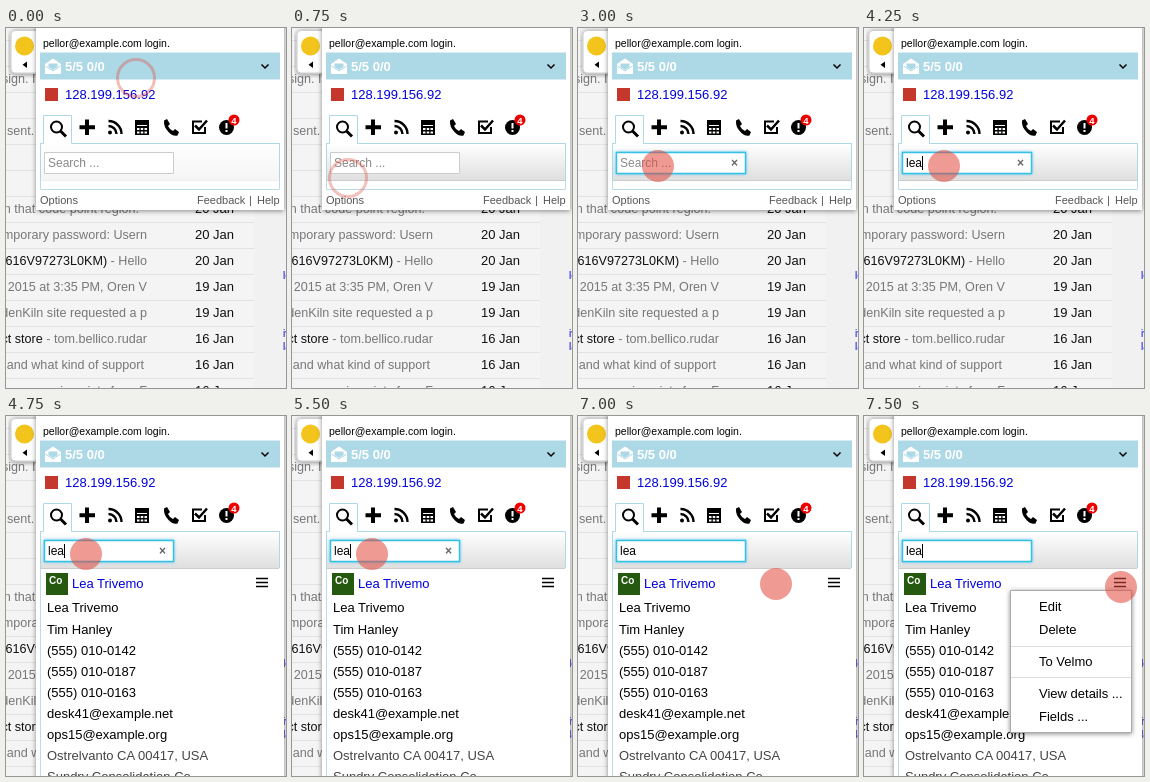
An HTML page for the animation above (8000 ms loop, 280 by 360 pixels).

```html
<!DOCTYPE html>
<html lang="en">
<head>
<meta charset="utf-8">
<title>Contact search</title>
<style>
html, body { margin: 0; width: 100%; height: 100%; overflow: hidden; background: #f4f4f4; }
svg { display: block; width: 280px; height: 360px; font: 13px "Liberation Sans", Arial, sans-serif; }
text { white-space: pre; }
.subject { fill: #777; font-size: 12.6px; }
.end { text-anchor: end; }
.link { fill: #00d; }
.small { font-size: 11px; fill: #555; }
.field { font-size: 12px; }
.line { fill: none; stroke: #000; }

/* Everything shares one 8 s clock and changes in hard steps */
.anim { animation: 8s step-end infinite; }
.short { animation-name: short; }
.tall { animation-name: tall; }
.shade { animation-name: shade; }
.idle { animation-name: idle; }
.focus { animation-name: focus; }
.clear { animation-name: clear; }
.hint { animation-name: hint; }
.key1 { animation-name: key1; }
.key2 { animation-name: key2; }
.key3 { animation-name: key3; }
.caret { animation-name: caret; }
.menu { animation-name: menu; }
.ring { animation-name: ring; }
.dot { animation-name: dot; }

@keyframes short { 0% { opacity: 1 } 59.375%, 100% { opacity: 0 } }
@keyframes tall { 0% { opacity: 0 } 59.375%, 100% { opacity: 1 } }
@keyframes shade { 0% { opacity: .3 } 3.125%, 100% { opacity: 1 } }
@keyframes idle { 0% { opacity: 1 } 18.75%, 100% { opacity: 0 } }
@keyframes focus { 0% { opacity: 0 } 18.75%, 100% { opacity: 1 } }
@keyframes clear { 0% { opacity: 0 } 18.75% { opacity: 1 } 84.375%, 100% { opacity: 0 } }
@keyframes hint { 0% { opacity: 1 } 40.625%, 100% { opacity: 0 } }
@keyframes key1 { 0% { opacity: 0 } 40.625%, 100% { opacity: 1 } }
@keyframes key2 { 0% { opacity: 0 } 46.875%, 100% { opacity: 1 } }
@keyframes key3 { 0% { opacity: 0 } 53.125%, 100% { opacity: 1 } }
@keyframes menu { 0% { opacity: 0 } 93.75%, 100% { opacity: 1 } }
@keyframes caret {
  0% { opacity: 0; transform: none }
  31.25% { opacity: 1; transform: none }
  37.5% { opacity: 0; transform: none }
  40.625% { opacity: 1; transform: translateX(3px) }
  46.875% { opacity: 1; transform: translateX(9px) }
  53.125% { opacity: 1; transform: translateX(16px) }
  62.5% { opacity: 0; transform: translateX(16px) }
  68.75% { opacity: 1; transform: translateX(16px) }
  75% { opacity: 0; transform: translateX(16px) }
  81.25% { opacity: 1; transform: translateX(16px) }
  87.5% { opacity: 0; transform: translateX(16px) }
  93.75%, 100% { opacity: 1; transform: translateX(16px) }
}
@keyframes ring {
  0% { opacity: .36; transform: translate(130px, 50px) }
  3.125% { opacity: .36; transform: translate(108px, 82px) }
  6.25% { opacity: .34; transform: translate(76px, 124px) }
  9.375% { opacity: .34; transform: translate(56px, 150px) }
  12.5% { opacity: .34; transform: translate(58px, 149px) }
  15.625% { opacity: .34; transform: translate(64px, 146px) }
  18.75% { opacity: .3; transform: translate(72px, 147px) }
  21.875% { opacity: .24; transform: translate(78px, 152px) scale(1.06) }
  25% { opacity: .16; transform: translate(80px, 155px) scale(1.14) }
  28.125% { opacity: .08; transform: translate(80px, 155px) scale(1.18) }
  31.25%, 100% { opacity: 0; transform: translate(80px, 155px) }
}
@keyframes dot {
  0% { opacity: 0; transform: translate(80px, 138px) }
  31.25% { opacity: .55; transform: translate(80px, 138px) }
  81.25% { opacity: .55; transform: translate(72px, 157px) }
  84.375% { opacity: .55; transform: translate(124px, 163px) }
  87.5% { opacity: .55; transform: translate(198px, 168px) }
  90.625%, 100% { opacity: .55; transform: translate(257px, 171px) }
}
</style>
</head>
<body>
<svg viewBox="0 0 280 360">
  <defs>
    <pattern id="rows" width="248" height="26" y="12" patternUnits="userSpaceOnUse">
      <path d="M0 .5H248" stroke="#e3e3e3"/>
    </pattern>
    <linearGradient id="bar" x2="0" y2="1">
      <stop offset="0" stop-color="#fff"/>
      <stop offset="1" stop-color="#dfdfdf"/>
    </linearGradient>
    <filter id="shadow" x="-10%" y="-10%" width="120%" height="120%">
      <feDropShadow dx="0" dy="1" stdDeviation="2.5" flood-opacity=".45"/>
    </filter>
    <filter id="glow" x="-10%" y="-40%" width="120%" height="180%">
      <feDropShadow dx="0" dy="0" stdDeviation="1.6" flood-color="#3cc3e8" flood-opacity=".8"/>
    </filter>
    <clipPath id="clip"><path d="M0 0H141V360H0z"/></clipPath>
  </defs>

  <!-- Mail list -->
  <path d="M0 0H280V360H0z" fill="#f4f4f4"/>
  <path d="M0 0H248V360H0z" fill="url(#rows)"/>
  <path d="M248 0H280V360H248z" fill="#f1f1f1"/>
  <g class="subject" clip-path="url(#clip)">
    <text x="-4" y="55">sign. I</text>
    <text x="1" y="107">sent. I</text>
    <g class="end">
      <text x="133" y="185">n that code point region.</text>
      <text x="141" y="211">emporary password: Usern</text>
      <text x="141" y="237"><tspan fill="#111">616V97273L0KM)</tspan> - Hello</text>
      <text x="141" y="263">2015 at 3:35 PM, Oren V</text>
      <text x="141" y="289">denKiln site requested a p</text>
      <text x="141" y="315"><tspan fill="#111">ct store</tspan> - tom.bellico.rudar</text>
      <text x="138" y="341">and what kind of support</text>
      <text x="141" y="367">e main points from F</text>
    </g>
  </g>
  <g fill="#111">
    <text x="189" y="185">20 Jan</text>
    <text x="189" y="211">20 Jan</text>
    <text x="189" y="237">20 Jan</text>
    <text x="189" y="263">19 Jan</text>
    <text x="189" y="289">19 Jan</text>
    <text x="189" y="315">16 Jan</text>
    <text x="189" y="341">16 Jan</text>
    <text x="189" y="367">16 Jan</text>
  </g>
  <g class="link" font-size="10">
    <text x="277" y="251">le</text>
    <text x="277" y="309">iv</text>
    <text x="277" y="322">la</text>
  </g>

  <!-- Side tab -->
  <path d="M34 2.500H9q-4 0-4 4V41q0 4 4 4H34z" fill="#fff" stroke="#ccc" filter="url(#shadow)"/>
  <circle cx="18.500" cy="18" r="9.500" fill="#f3c51c"/>
  <path d="M21 33.500V40L16.500 36.750z"/>

  <!-- Popup -->
  <g class="anim short">
    <path d="M30 -6H278V182H30z" fill="#fff" filter="url(#shadow)"/>
    <path d="M34.500 115V161.500H273.500V115" fill="none" stroke="#b9dce8"/>
    <text class="small" x="34" y="176">Options</text>
    <text class="small" x="191" y="176">Feedback</text>
    <text class="small" x="243" y="176">|</text>
    <text class="small" x="251" y="176">Help</text>
  </g>
  <g class="anim tall">
    <path d="M30 -6H278V370H30z" fill="#fff" filter="url(#shadow)"/>
    <path d="M34.500 115V360" stroke="#b9dce8"/>
    <path d="M40 157H62V179H40z" fill="#24590f"/>
    <text x="43" y="168" font-size="10" font-weight="bold" fill="#fff">Co</text>
    <text class="link" x="66" y="172">Lea Trivemo</text>
    <path class="line" d="M250 162.500H262M250 166.500H262M250 170.500H262" stroke-width="1.400"/>
    <text x="41" y="196">Lea Trivemo</text>
    <text x="41" y="218">Tim Hanley</text>
    <text x="41" y="239">(555) 010-0142</text>
    <text x="41" y="260">(555) 010-0187</text>
    <text x="41" y="281">(555) 010-0163</text>
    <text x="41" y="302">desk41@example.net</text>
    <text x="41" y="323">ops15@example.org</text>
    <text x="41" y="344" fill="#444">Ostrelvanto CA 00417, USA</text>
    <text x="41" y="365" fill="#444">Sundry Consolidation Co</text>
  </g>

  <!-- Header -->
  <text x="37" y="19" font-size="10.500">pellor@example.com login.</text>
  <path d="M34 24.500H274V51.500H34z" fill="#add8e6"/>
  <path d="M39 36L47 30.500L55 36V46H39z" fill="#fff"/>
  <path d="M42.500 35.500H51.500V39L47 42L42.500 39z" fill="#add8e6"/>
  <path d="M39.500 38L47 43L54.500 38" fill="none" stroke="#add8e6"/>
  <text x="59" y="43" font-weight="bold" fill="#fff">5/5 0/0</text>
  <path class="line" d="M255.500 36.500L259 40L262.500 36.500" stroke-width="1.500"/>
  <path d="M39 60H52V73H39z" fill="#c5372c"/>
  <text class="link" x="59" y="71">128.199.156.92</text>

  <!-- Tool tabs -->
  <path class="anim shade" d="M35 116H273V152H35z" fill="url(#bar)"/>
  <path d="M34.500 152V115.500H37.500V87.500H65.500V115.500H273.500V152" fill="none" stroke="#add8e6"/>
  <path d="M38 88H65V117H38z" fill="#fff"/>
  <path class="anim shade" d="M35 152.500H273" stroke="#ccc"/>
  <g class="line" stroke-width="2">
    <circle cx="50.500" cy="99" r="5.500"/>
    <path d="M54.500 103L60 108.500" stroke-width="3"/>
    <path d="M81 91.500V107M73.500 99.250H89" stroke-width="4"/>
    <path d="M102.500 93A13 13 0 0 1 115.500 106M102.500 98A8 8 0 0 1 110.500 106" stroke-width="2.400"/>
    <path d="M196 93.500H187V105H199V99"/>
    <path d="M189 97.500L193 101.500L201 92.500" stroke-width="2.500"/>
  </g>
  <circle cx="104" cy="104.500" r="2"/>
  <path d="M129 92H143V107H129z"/>
  <path d="M131 97.500H141" stroke="#fff"/>
  <path d="M131 101H141M131 104.500H141" stroke="#fff" stroke-width="2" stroke-dasharray="2.500 1.250"/>
  <path d="M158 92.500l3-1.500 3 5-2 2q1.500 3.500 5 5l2-2 4 3-1.500 3.500q-4 1.500-9-3.500t-4.500-11.500z"/>
  <circle cx="220.500" cy="99.500" r="7.500"/>
  <path d="M220.500 95V100.500M220.500 102V104" stroke="#fff" stroke-width="2"/>
  <circle cx="228" cy="92" r="5.500" fill="#e00"/>
  <text x="228" y="95.500" font-size="9.500" font-weight="bold" fill="#fff" text-anchor="middle">4</text>

  <!-- Search field -->
  <path class="anim idle" d="M38.500 124.500H167.500V145.500H38.500z" fill="#fff" stroke="#ccc"/>
  <path class="anim focus" d="M38.500 124.500H167.500V145.500H38.500z" fill="#fff" stroke="#35c0e6" stroke-width="1.500" filter="url(#glow)"/>
  <g class="field">
    <text class="anim hint" x="42" y="139" fill="#8a8a8a">Search ...</text>
    <text class="anim key1" x="42" y="139">l</text>
    <text class="anim key2" x="44.670" y="139">e</text>
    <text class="anim key3" x="51.340" y="139">a</text>
    <path class="anim caret" d="M42.500 128V142" stroke="#000"/>
    <text class="anim clear" x="153" y="139" font-weight="bold" fill="#666">×</text>
  </g>

  <!-- Context menu -->
  <g class="anim menu">
    <path d="M146.500 174.500H267.500V316.500H146.500z" fill="#fff" stroke="#aaa" filter="url(#shadow)"/>
    <path d="M147 230.500H267M147 261.500H267" stroke="#ddd"/>
    <text x="175" y="195">Edit</text>
    <text x="175" y="218">Delete</text>
    <text x="175" y="250">To Velmo</text>
    <text x="175" y="282">View details ...</text>
    <text x="175" y="305">Fields ...</text>
  </g>

  <!-- Pointer -->
  <circle class="anim ring" r="18.500" fill="none" stroke="#e0483c" stroke-width="3"/>
  <circle class="anim dot" r="16" fill="#e2483c"/>
</svg>
</body>
</html>
```
